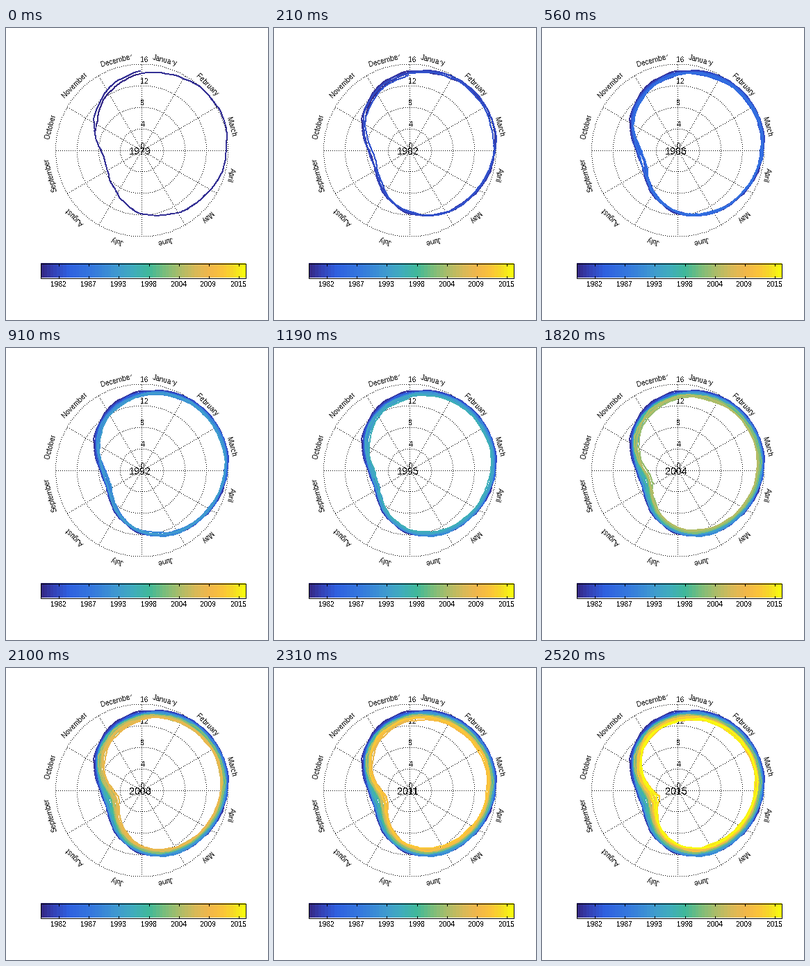
Animation, 377 px wide and 420 px high, one loop 2.66 s. Source, as a matplotlib script:

```python
import numpy as np
import matplotlib as mpl
import matplotlib.pyplot as plt
from matplotlib.animation import FuncAnimation
from matplotlib.colors import LinearSegmentedColormap

W, H, DPI = 377, 420, 64
CX, CY, UNIT = 195, 176.5, 7.75
FIRST, LAST, DAYS = 1978, 2015, 365
STEP_MS, STEPS = 70, 38
HELD = {0, 3, 5, 11, 13, 20, 27, 36}  # steps that already show the next year

mpl.rcParams["font.family"] = "Liberation Sans"
mpl.rcParams["text.antialiased"] = False


def pt(px):
    return px * 72 / DPI


fig = plt.figure(figsize=(W / DPI, H / DPI), dpi=DPI, facecolor="white")
ax = fig.add_axes([0, 0, 1, 1])
ax.axis("off")

CMAP = LinearSegmentedColormap.from_list("years", [
    (0, "#352a87"), (.05, "#343fb2"), (.13, "#2f61e0"), (.25, "#3579de"),
    (.37, "#3f9ad0"), (.45, "#3fadbd"), (.53, "#41b99a"), (.6, "#76bd7d"),
    (.68, "#abbd69"), (.76, "#d9ba58"), (.83, "#f3b74a"), (.9, "#fcc637"),
    (.95, "#f6dd25"), (1, "#f9fb0e")], N=64)


def polar(deg, r):
    a = np.radians(deg)
    return CX + r * np.sin(a), CY - r * np.cos(a)


def label(x, y, text, size, **kw):
    kw = {"ha": "center", "va": "center", "color": "#202020", **kw}
    return ax.text(x, y, text, fontsize=pt(size), **kw)


def dots(x, y):
    ax.plot(x, y, ",", color="black", zorder=1)


def draw_grid():
    gap, rim = 3, 16 * UNIT
    for value in range(4, 17, 4):
        r = value * UNIT
        dots(*polar(np.arange(0, 360, np.degrees(gap / r)), r))
        label(193.5, CY - r - 7.6, str(value), 10.5, ha="left", va="center_baseline")
    label(193.5, CY - 7.6, "0", 10.5, ha="left", va="center_baseline")
    for deg in range(0, 360, 30):
        dots(*polar(deg, np.arange(0, rim, gap)))
    months = ("January February March April May June July August "
              "September October November December").split()
    for i, name in enumerate(months):
        deg = 15 + 30 * i
        x, y = polar(deg, 134)
        label(x - 1, y, name, 10.2, rotation=-deg)


def draw_colorbar():
    x0, x1, y0, y1 = 49.5, 344.5, 338.5, 359.5
    ax.imshow(np.linspace(0, 1, 64)[None], cmap=CMAP, extent=(x0, x1, y1, y0),
              aspect="auto", interpolation="nearest")
    edge = dict(color="black", lw=pt(1), zorder=4)
    ax.plot([x0, x1, x1, x0, x0], [y0, y0, y1, y1, y0], **edge)
    for i in range(7):
        year = int(1982 + 5.5 * i)
        x = round(75 + 43.2 * i) + .5
        ax.plot([x, x], [y1, y1 - 3], **edge)
        ax.plot([x, x], [y0, y0 + 3], **edge)
        label(x, 369, str(year), 10.3, color="black")


def season(a):
    """Extent through the year in the first years, a = angle of the day."""
    return (12.46 + 1.62 * np.cos(a) + 4.04 * np.sin(a)
            + .68 * np.cos(2 * a) - .28 * np.sin(2 * a)
            - .23 * np.cos(3 * a) - .18 * np.sin(3 * a))


def loss(a, u):
    """Steady loss all year, growing faster around September."""
    autumn = np.exp(-((np.degrees(a) - 250) / 50) ** 2)
    return 1.5 * u + 1.3 * autumn * u * abs(u)


def extent():
    """Daily extent, one row per year."""
    rng = np.random.default_rng(7)
    years = np.arange(FIRST, LAST + 1)
    day = np.arange(DAYS)
    time = years[:, None] + day / DAYS
    a = 2 * np.pi * day / DAYS
    trend = season(a) - loss(a, (time - 1979) / 36)

    # Weather swings at four moments of each year, with a few marked Septembers
    swing = rng.normal(0, [.2, .2, .35, .3], (len(years), 4)).clip(-.5, .5)
    for year, value in {1978: .6, 1979: 0, 2007: -.7, 2012: -1}.items():
        swing[year - FIRST, 2] = value
    knots = years[:, None] + np.array([68, 165, 258, 310]) / DAYS
    drift = np.interp(time, knots.ravel(), swing.ravel())

    n = time.size
    slow = np.convolve(rng.normal(0, .3, n), np.hanning(25) / 12, "same")
    fast = np.convolve(rng.normal(0, .07, n), np.ones(4) / 4, "same")
    return trend + drift + (slow + fast).reshape(time.shape)


def draw_years():
    lines = []
    for i, values in enumerate(extent()):
        start = 298 if i == 0 else 0
        deg = np.arange(start, DAYS) * 360 / DAYS
        x, y = polar(deg, values[start:] * UNIT)
        lines += ax.plot(x, y, color=CMAP(i / (LAST - FIRST)), lw=pt(.9),
                         antialiased=False, zorder=3 + i / 100)
    return lines


draw_grid()
draw_colorbar()
lines = draw_years()
counter = label(193, 177, "", 14.2, va="center_baseline", color="black", zorder=5)
ax.set(xlim=(0, W), ylim=(H, 0))


def update(step):
    shown = step + (step in HELD)
    for i, line in enumerate(lines):
        line.set_visible(i <= shown)
    counter.set_text(str(FIRST + shown))
    return [*lines, counter]


anim = FuncAnimation(fig, update, frames=STEPS, interval=STEP_MS,
                     init_func=lambda: update(0), repeat=True, repeat_delay=0)
plt.show()
```
